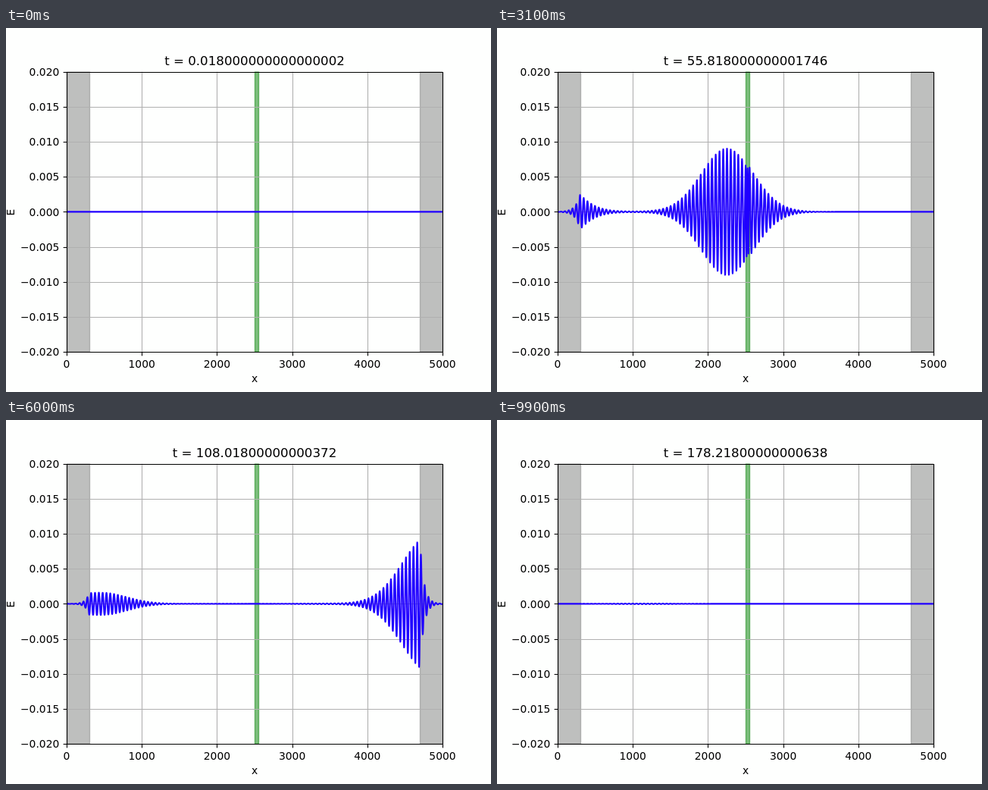
Write an HTML page that moves like this. It is 640 by 480 pixels and loops after 10000 ms.

```html
<!DOCTYPE html>
<html lang="en">
<head>
<meta charset="utf-8">
<title>Wave pulse through a thin layer</title>
<style>
  html, body { margin: 0; width: 100%; height: 100%; overflow: hidden; background: #fefffe; }
  svg { display: block; width: 640px; height: 480px; }
  text { font-family: "DejaVu Sans", sans-serif; font-size: 13.89px; fill: #000; }
  #title { font-size: 16.67px; }
</style>
</head>
<body>
<svg id="stage" viewBox="0 0 640 480" xmlns="http://www.w3.org/2000/svg">
  <clipPath id="axes"><rect x="80" y="57.6" width="496" height="369.6"/></clipPath>
</svg>
<script>
const stage = document.getElementById('stage');
const LEFT = 80, RIGHT = 576, TOP = 57.6, BOTTOM = 427.2;
const px = x => LEFT + x / 5000 * (RIGHT - LEFT);
const py = e => (TOP + BOTTOM) / 2 - e / 0.04 * (BOTTOM - TOP);
const snap = v => Math.floor(v + 0.5) + 0.5;

function add(tag, attrs, text) {
  const el = document.createElementNS('http://www.w3.org/2000/svg', tag);
  for (const key in attrs) el.setAttribute(key, attrs[key]);
  if (text !== undefined) el.textContent = text;
  return stage.appendChild(el);
}

const line = (d, stroke, width, extra) =>
  add('path', { d, stroke, 'stroke-width': width, fill: 'none', ...extra });
const label = (x, y, text, anchor = 'middle', extra) =>
  add('text', { x, y, 'text-anchor': anchor, ...extra }, text);
const clipped = { 'clip-path': 'url(#axes)' };

function span(from, to, color) {
  const x = snap(px(from));
  add('rect', {
    x, y: TOP, width: snap(px(to)) - x, height: BOTTOM - TOP, fill: color, stroke: color,
    'stroke-width': 1.39, 'fill-opacity': 0.5, 'stroke-opacity': 0.5, ...clipped
  });
}

// Leapfrog solution of the 1D wave with absorbing ends and a dielectric layer.
const NODES = 5000, FRAMES = 100, STEPS = 100, FRAME_MS = 100;
const H = 0.02, TAU = 0.9 * H, SOURCE = 1000, ABSORBER = 300;

function simulate() {
  const E = new Float64Array(NODES), B = new Float64Array(NODES);
  const keep = new Float64Array(NODES), gainE = new Float64Array(NODES), gainB = new Float64Array(NODES);
  for (let i = 0; i < NODES; i++) {
    const loss = i < ABSORBER || i >= NODES - ABSORBER ? TAU / 2 : 0;
    const eps = i > 2500 && i < 2550 ? 4 : 1;
    keep[i] = (1 - loss) / (1 + loss);
    gainB[i] = TAU / H / (1 + loss);
    gainE[i] = gainB[i] / eps;
  }
  const frames = [];
  let t = 0;
  for (let n = 0; n <= (FRAMES - 1) * STEPS; n++) {
    for (let i = 0; i < NODES - 1; i++) B[i] = keep[i] * B[i] + gainB[i] * (E[i + 1] - E[i]);
    for (let i = 1; i < NODES - 1; i++) E[i] = keep[i] * E[i] + gainE[i] * (B[i] - B[i - 1]);
    E[SOURCE] -= TAU * Math.exp(-((t - 30) ** 2) / 100) * Math.sin(2 * Math.PI * t);
    t += TAU;
    if (n % STEPS === 0) frames.push({ t, field: Float32Array.from(E) });
  }
  return frames;
}

span(0, ABSORBER, '#808080');
span(NODES - ABSORBER, NODES, '#808080');
span(2500, 2550, '#008000');

for (let x = 0; x <= 5000; x += 1000) {
  const at = snap(px(x));
  line(`M${at} ${TOP}V${BOTTOM}`, '#b0b0b0', 1.11, clipped);
  line(`M${at} 427.5v4.86`, '#000', 1.11);
  label(px(x), 448, x);
}
for (let k = -4; k <= 4; k++) {
  const e = k * 0.005, at = snap(py(e));
  line(`M${LEFT} ${at}H${RIGHT}`, '#b0b0b0', 1.11, clipped);
  line(`M80.5 ${at}h-4.86`, '#000', 1.11);
  label(70.3, py(e) + 5.2, e.toFixed(3).replace('-', '\u2212'), 'end');
}
const wave = line('', '#2000ff', 2.08, { 'stroke-linejoin': 'round', ...clipped });
line('M80.5 58.5H576.5V427.5H80.5Z', '#000', 1.11);
label(328, 467, 'x');
label(0, 0, 'E', 'middle', { transform: 'translate(11.4 243) rotate(-90)' });
const title = label(328, 49.3, '', 'middle', { id: 'title' });

const frames = simulate();
let shown = -1;

function draw(now) {
  const index = Math.floor(now / FRAME_MS) % FRAMES;
  if (index !== shown) {
    shown = index;
    const { t, field } = frames[index];
    let d = '';
    for (let i = 0; i < NODES; i++) d += (i ? 'L' : 'M') + px(i).toFixed(2) + ' ' + py(field[i]).toFixed(2);
    wave.setAttribute('d', d);
    title.textContent = 't = ' + t;
  }
}

function tick() {
  draw(performance.now());
  requestAnimationFrame(tick);
}
draw(0);
requestAnimationFrame(tick);
</script>
</body>
</html>
```
